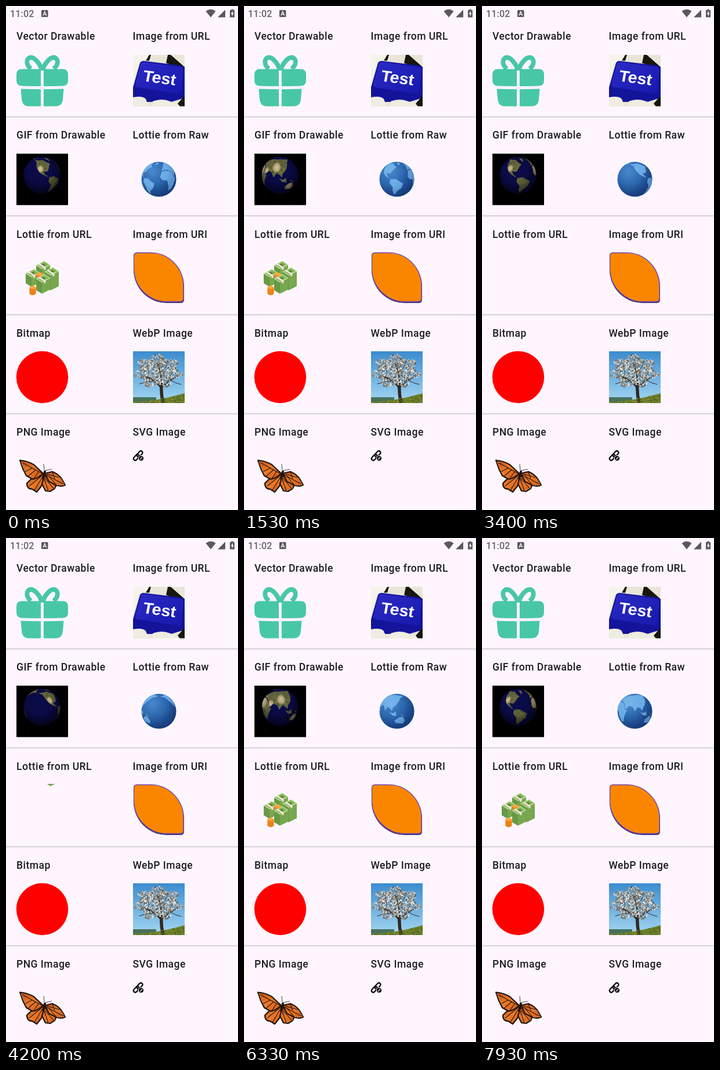
Animation of 400 by 867 pixels, one loop 8 s. Source, as an HTML page with a canvas:

```html
<!DOCTYPE html>
<html lang="en">
<head>
<meta charset="utf-8">
<title>Image gallery</title>
<style>
html, body { margin: 0; width: 100%; height: 100%; overflow: hidden; background: #fef5ff; }
svg, canvas { position: absolute; left: 0; top: 0; width: 400px; height: 867px; }
.title { font: 500 17.5px Roboto, sans-serif; letter-spacing: .48px; fill: #1d1b20; }
.clock { font: 500 16px Roboto, sans-serif; letter-spacing: .2px; fill: #67616b; }
#money { animation: leave 8s infinite; }
.piece { animation: fall 8s infinite; animation-delay: var(--wait); }
@keyframes leave {
  0%, 30.5% { transform: none; animation-timing-function: ease-in; }
  32.5% { transform: translateY(-4px); animation-timing-function: ease-in; }
  39%, 49% { transform: translateY(-85px); }
  49.01%, 100% { transform: none; }
}
@keyframes fall {
  0%, 40% { transform: none; }
  40.01%, 51.5% { transform: translateY(-85px); animation-timing-function: cubic-bezier(.3, .3, .5, 1); }
  56.5%, 100% { transform: none; }
}
</style>
</head>
<body>
<svg viewBox="0 0 400 867">
  <defs>
    <clipPath id="keyBox"><path d="M219 84h89v88.500h-89z"/></clipPath>
    <clipPath id="moneyBox"><path d="M18 423h89v89h-89z"/></clipPath>
    <linearGradient id="keyFace" x2="1" y2="1">
      <stop stop-color="#2c2cc6"/><stop offset="1" stop-color="#1818ae"/>
    </linearGradient>
    <linearGradient id="wing" x2=".8" y2="1">
      <stop stop-color="#b54a18"/><stop offset=".5" stop-color="#ea7a26"/><stop offset="1" stop-color="#d55f1c"/>
    </linearGradient>
  </defs>

  <!-- status bar -->
  <text class="clock" x="7" y="19">11:02</text>
  <g fill="#5b565f">
    <rect x="61" y="7" width="11.500" height="12" rx="1.500"/>
    <path d="M344.500 9Q353 2.500 361.500 9L353 19.500ZM365 19.500H378V6.500Z"/>
    <path d="M388.500 5.500h3v1.500h2.500v12.500h-8V7h2.500z"/>
  </g>
  <path d="M64 16.500L66.800 9.500L69.600 16.500M65 14.300h3.600" fill="none" stroke="#fef5ff" stroke-width="1.300"/>
  <path d="M391 8.500l-3.300 5.300h2v4l3-5.300h-1.700z" fill="#fef5ff"/>

  <g id="titles"></g>

  <!-- gift -->
  <g fill="#48c7a7">
    <path d="M27 108.500H98Q107 108.500 107 118V128Q107 137 98 137.500Q62 138.500 27 137.500Q18 137 18 128V118Q18 108.500 27 108.500Z"/>
    <path d="M25.500 142.500Q62 144 99.500 142.500L98 160Q97 172.500 85 172.500H40Q28 172.500 27 160Z"/>
    <path id="loop" d="M61.500 109C58 98 49 88.500 43 88.500C34.500 89 33.500 101 43 108" fill="none" stroke="#48c7a7" stroke-width="7.800"/>
    <use href="#loop" transform="matrix(-1 0 0 1 125 0)"/>
  </g>
  <path d="M62.500 111V173" stroke="#fef5ff" stroke-width="4.800"/>

  <!-- keyboard key -->
  <g clip-path="url(#keyBox)">
    <path d="M219 84h89v89h-89z" fill="#e9e6d8"/>
    <path d="M219 84H248L243 95L229 99L219 133Z" fill="#f5f3ea"/>
    <path d="M247 84h3l-3 10h-6zM279 84h5l24 21v5L276 98z" fill="#17160f"/>
    <path d="M231 98Q233 94 238 94.500L300 102Q308 103 308 108V158L285 165H243L219 157V140Z" fill="#14149a"/>
    <path d="M233 98Q235 96 239 96.500L301 105Q306 106 306 111L302 146Q301 151 296 150.500L228 140Q222 139 223 134Z" fill="url(#keyFace)"/>
    <path d="M219 157Q236 154 241 160L246 173H219ZM250 173L253 164Q268 158 283 164L300 170V173Z" fill="#efece1"/>
    <path d="M308 154L296 168L300 173H308Z" fill="#17160f"/>
    <text transform="matrix(1.020 .135 -.170 .960 235 129)" font-family="Liberation Sans, Arial, sans-serif" font-size="28" font-weight="700" fill="#fff">Test</text>
  </g>

  <g clip-path="url(#moneyBox)"><g id="money"></g></g>

  <!-- leaf -->
  <path d="M226 426H250A57 57 0 0 1 307 483V505Q307 511 301 511H277A57 57 0 0 1 220 454V431Z" fill="#4a3576"/>
  <path d="M226 424.500H249A57 57 0 0 1 306 481.500V502.500Q306 508.500 300 508.500H277.500A57 57 0 0 1 220.500 451.500V430Q220.500 424.500 226 424.500Z" fill="#fa8600" stroke="#6c43b4" stroke-width="1.300"/>

  <circle cx="62.500" cy="638.500" r="44.700" fill="#f00"/>

  <!-- butterfly -->
  <g fill="url(#wing)" stroke="#21140f" stroke-width="2.200" stroke-linejoin="round">
    <path d="M62 805L46 811L36 821Q36 831 45 831L53 836L61 826L66 812Z"/>
    <path d="M66 808L84 816Q88 824 84 830L76 835L68 834L62 822Z"/>
    <path d="M24 781.500Q36 782 48 789L64 804Q55 813 46 814L35 808L29 796Z"/>
    <path d="M67 804L80 801Q92 806 97 815L102 824Q97 827 88 825L74 818Z"/>
    <path d="M29 786L62 804M33 801L45 795M38 809L51 798M48 813L56 801M62 808L40 826M63 810L49 833M68 806L98 822M70 805L92 811M74 809L86 823M67 812L82 830M66 814L73 834M80 802L84 813" fill="none" stroke-width="1.100"/>
    <path d="M26 785L33 801L45 812M95 813L101 824L88 824M38 821L48 831M84 829L72 834" fill="none" stroke="#f5e6d6" stroke-width=".9" stroke-dasharray="1 2.500"/>
    <path d="M67 801L64 813" stroke-width="4" stroke-linecap="round"/>
    <path d="M66 799L65 788M68 799L79 797" fill="none" stroke-width=".8"/>
  </g>

  <!-- chain link -->
  <g fill="none" stroke="#080808" stroke-width="2.200">
    <rect x="-5.800" y="-3" width="11.600" height="6" rx="3" transform="translate(224.800 776.500) rotate(-48)"/>
    <rect x="-5.800" y="-3" width="11.600" height="6" rx="3" transform="translate(230.500 770.500) rotate(-48)"/>
  </g>
  <circle cx="233" cy="778" r="4.600" fill="#080808" stroke="#fef5ff"/>
  <path d="M231 780L235 776" stroke="#fef5ff" stroke-width="1.200"/>
</svg>
<canvas width="400" height="867"></canvas>

<script>
const LOOP = 8000, STEP = 200 / 3;
const ctx = document.querySelector('canvas').getContext('2d');
const byId = id => document.getElementById(id);

const titles = ['Vector Drawable', 'Image from URL', 'GIF from Drawable', 'Lottie from Raw', 'Lottie from URL',
  'Image from URI', 'Bitmap', 'WebP Image', 'PNG Image', 'SVG Image'];
byId('titles').innerHTML = titles.map((title, i) => {
  const y = 58 + (i >> 1) * 170.25;
  const line = i % 2 || i > 7 ? '' : `<path d="M0 ${y + 132.7}H400" stroke="#cbc5d0" stroke-width="1.400"/>`;
  return `<text class="title" x="${i % 2 ? 218.500 : 18}" y="${y}">${title}</text>${line}`;
}).join('');

// Stacks of notes and coins, back to front.
const piece = (x, y, wait, art) =>
  `<g class="piece" style="--wait:${wait}s"><g transform="translate(${x} ${y})">${art}</g></g>`;

function notes(x, y, h, wait) {
  let seams = '';
  for (let k = 2.5; k < h; k += 2.5) seams += `M-12 ${k}L-2 ${6 + k}L12 ${k - 1}`;
  return piece(x, y, wait, `
    <path d="M-12 0L-2 6V${6 + h}L-12 ${h}Z" fill="#6f9f4a"/>
    <path d="M-2 6L12 -1V${h - 1}L-2 ${6 + h}Z" fill="#83b356"/>
    <path d="${seams}" fill="none" stroke="#56843a" stroke-width=".6"/>
    <path d="M-12 0L2 -7.500L12 -1L-2 6Z" fill="#a6cf78" stroke="#e3f0cf" stroke-width=".6"/>
    <path d="M-9 0L2 -5.500L9 -1L-2 4Z" fill="#7fb052"/>
    <ellipse rx="3.200" ry="1.900" fill="#47762f"/>
    <path d="M-9 -1.600L-6 -3.200L4.500 3V7L1.500 8.500V4.500Z" fill="#f4e3dc"/>`);
}

function coins(x, y, h, wait) {
  let rims = '';
  for (let k = 2.5; k < h; k += 2.5) rims += `M-5.500 ${k}Q0 ${k + 5} 5.500 ${k}`;
  return piece(x, y, wait, `
    <path d="M-5.500 0V${h}Q0 ${h + 5} 5.500 ${h}V0Z" fill="#f28a1b"/>
    <path d="${rims}" fill="none" stroke="#d86f10" stroke-width=".7"/>
    <ellipse rx="5.500" ry="2.600" fill="#ffa63d"/>`);
}

byId('money').innerHTML = notes(64, 446, 16, .1) + notes(79, 457, 26, 0) + notes(46, 460, 17, .2) +
  coins(58, 461, 5, .4) + notes(64, 469, 20, .3) + coins(46, 484, 11, .45);

// Outlines as longitude, latitude pairs.
const lands = [
  [-165,65, -125,70, -95,72, -80,64, -58,52, -70,43, -81,27, -97,27, -90,17, -80,9, -95,15, -110,24, -124,40, -135,58],
  [-78,8, -60,9, -35,-7, -40,-22, -55,-35, -68,-54, -74,-45, -71,-20, -81,-5],
  [-55,80, -20,80, -25,70, -45,60],
  [-16,15, -8,34, 10,37, 32,31, 43,11, 51,11, 40,-10, 33,-27, 19,-34, 9,3, -8,5],
  [-9,38, -2,48, 10,63, 28,71, 105,77, 140,73, 178,67, 142,57, 130,42, 121,31, 108,20, 105,9, 98,16, 88,22, 78,8, 70,22, 57,26, 44,13, 34,31, 15,40],
  [114,-23, 131,-12, 142,-11, 152,-26, 146,-38, 116,-34],
  [96,5, 106,-6, 120,-8, 118,6, 108,1],
  [131,-1, 150,-9, 140,-8]
];
const deserts = [[5, 22, 26], [45, 24, 14], [85, 42, 20], [132, -25, 16], [-108, 36, 14]];
const MAP_W = 720, MAP_H = 360;

function seeded(seed) {
  return () => (seed = seed * 16807 % 2147483647) / 2147483647;
}

function newCanvas(w, h) {
  return Object.assign(document.createElement('canvas'), { width: w, height: h }).getContext('2d');
}

// Flat world map as packed pixels.
function paintMap(sea, land, natural) {
  const c = newCanvas(MAP_W, MAP_H);
  const shape = new Path2D();
  for (const line of lands) {
    for (let i = 0; i < line.length; i += 2) {
      shape[i ? 'lineTo' : 'moveTo']((line[i] + 180) * 2, (90 - line[i + 1]) * 2);
    }
    shape.closePath();
  }
  if (sea) { c.fillStyle = sea; c.fillRect(0, 0, MAP_W, MAP_H); }
  c.fillStyle = land;
  c.fill(shape);
  if (natural) {
    c.save();
    c.clip(shape);
    const rnd = seeded(5);
    for (let i = 0; i < 700; i++) {
      c.fillStyle = rnd() < .5 ? 'rgba(45,62,25,.5)' : 'rgba(150,140,95,.5)';
      c.fillRect(rnd() * MAP_W, rnd() * MAP_H, 4 + rnd() * 12, 3 + rnd() * 7);
    }
    for (const [lon, lat, size] of deserts) {
      const x = (lon + 180) * 2, y = (90 - lat) * 2;
      const g = c.createRadialGradient(x, y, 0, x, y, size * 2);
      g.addColorStop(0, '#dcc79a');
      g.addColorStop(.6, 'rgba(208,186,140,.8)');
      g.addColorStop(1, 'rgba(200,175,130,0)');
      c.fillStyle = g;
      c.fillRect(0, 0, MAP_W, MAP_H);
    }
    c.restore();
    c.fillStyle = '#c4c2b8';
    c.fillRect(0, MAP_H - 34, MAP_W, 34);
  }
  return new Uint32Array(c.getImageData(0, 0, MAP_W, MAP_H).data.buffer);
}

function shade(x, y, r, stops) {
  const g = ctx.createRadialGradient(x, y, 0, x, y, r);
  stops.forEach((color, i) => g.addColorStop(i / (stops.length - 1), color));
  return g;
}

// Returns a function that draws the globe seen from above a longitude.
function makeGlobe({ cx, cy, r, tilt, map, sea, gloss }) {
  const size = 126, q = tilt * Math.PI / 180;
  const ball = newCanvas(size, size);
  const image = ball.createImageData(size, size);
  const pixels = new Uint32Array(image.data.buffer);
  const cells = [];
  for (let i = 0; i < size * size; i++) {
    const scale = 2 / size;
    let x = (i % size + .5) * scale - 1, y = 1 - (Math.floor(i / size) + .5) * scale;
    const d = Math.max(1, Math.hypot(x, y));
    x /= d;
    y /= d;
    const z = Math.sqrt(Math.max(0, 1 - x * x - y * y));
    const lat = Math.asin(y * Math.cos(q) + z * Math.sin(q));
    const lon = Math.atan2(x, z * Math.cos(q) - y * Math.sin(q));
    const row = Math.min(MAP_H - 1, Math.floor((.5 - lat / Math.PI) * MAP_H));
    cells.push({ row: row * MAP_W, col: (lon / Math.PI + 1) * MAP_W / 2 });
  }
  return lon => {
    const turn = lon * 2 + MAP_W * 4;
    cells.forEach(({ row, col }, i) => { pixels[i] = map[row + Math.floor(col + turn) % MAP_W]; });
    ball.putImageData(image, 0, 0);
    ctx.save();
    ctx.beginPath();
    ctx.arc(cx, cy, r, 0, 7);
    ctx.fillStyle = sea;
    ctx.fill();
    ctx.clip();
    ctx.drawImage(ball.canvas, cx - r, cy - r, 2 * r, 2 * r);
    ctx.fillStyle = gloss;
    ctx.fillRect(cx - r, cy - r, 2 * r, 2 * r);
    ctx.restore();
  };
}

const drawEarth = makeGlobe({ cx: 62, cy: 291, r: 31.5, tilt: 16, sea: '#0b0b4c',
  map: paintMap('#0b0b4c', '#67693f', true),
  gloss: shade(58, 282, 44, ['rgba(0,0,0,0)', 'rgba(0,0,0,.1)', 'rgba(0,0,0,.75)']) });
const drawBall = makeGlobe({ cx: 263.5, cy: 298, r: 30, tilt: 8, map: paintMap('', '#6fb1ea'),
  sea: shade(252, 284, 48, ['#3f83cb', '#2d69b0', '#1a4180']),
  gloss: shade(254, 285, 48, ['rgba(255,255,255,.05)', 'rgba(10,40,100,.05)', 'rgba(10,40,100,.4)']) });

const times = [0, 1530, 2600, 4200, 5670, 6330, LOOP];
const earthTurn = [-102, -268, -372, -500, -595, -645, -798];
const ballTurn = [-20, -58, -78, -175, -224, -240, -286];

function at(t, values) {
  const i = Math.max(1, times.findIndex(x => x > t));
  return values[i - 1] + (values[i] - values[i - 1]) * (t - times[i - 1]) / (times[i] - times[i - 1]);
}

function drawTree() {
  const rnd = seeded(71);
  ctx.save();
  ctx.beginPath();
  ctx.rect(219, 594, 89, 89);
  ctx.clip();
  const sky = ctx.createLinearGradient(0, 594, 0, 678);
  sky.addColorStop(0, '#3b8ccf');
  sky.addColorStop(1, '#9fd3f0');
  ctx.fillStyle = sky;
  ctx.fillRect(219, 594, 89, 89);
  ctx.fillStyle = '#47705a';
  ctx.fillRect(219, 673, 40, 8);
  ctx.fillStyle = '#6d7f2a';
  ctx.fill(new Path2D('M219 681Q262 680 308 666V683H219Z'));

  const dots = (count, tones, size) => {
    for (let i = 0; i < count; i++) {
      const a = rnd() * 2 * Math.PI, d = Math.sqrt(rnd()) * (.9 + .14 * Math.sin(a * 7));
      ctx.fillStyle = tones[Math.floor(rnd() * tones.length)];
      ctx.beginPath();
      ctx.arc(262 + 41 * d * Math.cos(a), 628 + 29 * d * Math.sin(a), size * (.5 + rnd()), 0, 7);
      ctx.fill();
    }
  };
  dots(480, ['#7f8079', '#a5a6a2', '#c3c4c2', '#66685f'], 1.5);
  ctx.strokeStyle = '#33281f';
  ctx.lineCap = 'round';
  [['M270 680Q267 664 268 650', 5.5], ['M268 658Q258 644 241 637M268 652Q268 632 260 612M268 656Q284 642 295 637', 2],
    ['M256 645Q244 645 230 650M268 636Q276 624 279 609M284 644Q292 649 302 651M248 640L244 618M280 645L290 622', 1]
  ].forEach(([path, width]) => {
    ctx.lineWidth = width;
    ctx.stroke(new Path2D(path));
  });
  dots(620, ['#e6e5e1', '#cfcfcb', '#f4f4f2', '#8f8f88', '#6b665c'], .95);
  dots(130, ['#4a4238', '#5b97cb'], .8);
  for (let i = 0; i < 130; i++) {
    ctx.fillStyle = rnd() < .6 ? '#465a1c' : '#8c9838';
    const x = 225 + rnd() * 83;
    ctx.fillRect(x, 683 - rnd() * (x - 219) * .17, 2.5, 1);
  }
  ctx.restore();
}

function drawEarthBox(t) {
  ctx.fillStyle = '#000';
  ctx.fillRect(18, 254, 89, 88.5);
  const rnd = seeded(9);
  ctx.fillStyle = '#2b2b2b';
  for (let i = 0; i < 26; i++) ctx.fillRect(19 + rnd() * 86, 255 + rnd() * 86, .9, .9);
  drawEarth(at(t, earthTurn));
}

function frame(now) {
  const t = Math.floor(now % LOOP / STEP) * STEP;
  ctx.clearRect(0, 250, 400, 100);
  drawEarthBox(t);
  drawBall(at(t, ballTurn));
  requestAnimationFrame(() => frame(performance.now() - start));
}

const start = performance.now();
drawTree();
frame(0);
</script>
</body>
</html>
```
